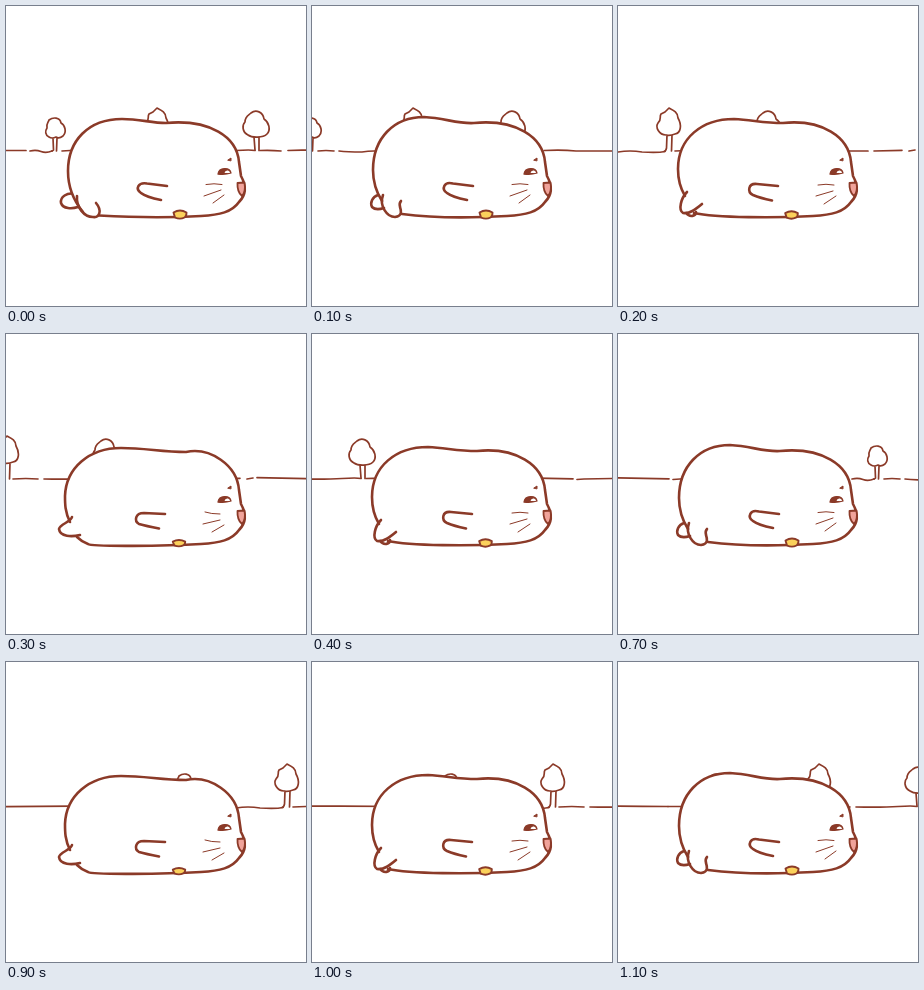
Write an HTML page that moves like this. It is 300 by 300 pixels and loops after 1.2 s.

```html
<!DOCTYPE html>
<html lang="en">
<head>
<meta charset="utf-8">
<title>Rolling along</title>
<style>
  html, body { margin: 0; width: 100%; height: 100%; overflow: hidden; background: #fff; }
  svg { display: block; width: 100vw; height: 100vh; }
  path { fill: none; stroke: #8b3a28; stroke-linecap: round; stroke-linejoin: round; }
  #scenery path { stroke-width: 1.7; }
  .bold path { stroke-width: 2.6; }
  #body { fill: #fff; }
  #whiskers { stroke-width: 1; }
</style>
</head>
<body>
<svg viewBox="0 0 300 300">
  <g id="scenery">
    <g id="strip">
      <!-- ground -->
      <path d="M0 144.5H20 M24 145Q30 143.500 35 145.500T46 145 M56 145Q64 144 72 145 M77 145
               Q85 146 100 146Q112 144 124 146Q140 147 147 145.500 M157 145Q170 144 182 145
               M188 145Q215 145.500 230 144.500T249 144.500 M254 144.500Q265 144 275 145 M282 144.500Q300 143.500 314 145
               H350 M356 145L384 144.300 M391 145L397 144 M401 143.700L461 144.800 M465 145.500L472 145
               Q540 143.500 620 144.500"/>
      <!-- trees -->
      <path d="M43 131C39 129 39 125 41 122C40 118 42 117 43 114C47 111 54 111 55 117
               C59 119 61 126 57 130Q53 133 50 131Q46 133 43 131 M47 132L47.500 144L46 145 M51 132L50.500 145"/>
      <path d="M148 129C141 129 137 121 140 117C144 114 141 111 143 108L147 106 151 102
               C155 104 160 106 160 112C164 119 163 127 157 128Q152 130 148 129
               M149 129L148.500 142Q148 145 146 145.500 M154 129L153.500 145"/>
      <path d="M242 129C236 126 236 119 239 116C239 110 243 109 245 107C250 103 257 106 258 113
               C263 116 265 124 261 128C257 132 246 132 242 129 M248 131L249 144 M253 131V144.500"/>
    </g>
    <use href="#strip" x="620"/>
  </g>
  <g class="bold">
    <path id="tail"/>
    <path id="body"/>
    <path id="foot"/>
    <path id="flipper"/>
  </g>
  <path id="whiskers"/>
  <path id="toe" style="fill:#fbd15b;stroke-width:1.9"/>
  <path d="M231.500 177L238.500 176.500Q240 186 236 190Q231 186 231.500 177Z" style="fill:#f0a39a;stroke-width:1.8"/>
  <path d="M212 168C213 161 224 161 225 167Q219 169 212 168Z" style="fill:#8b3a28;stroke-width:1.3"/>
  <path d="M218.500 167Q219 164 222 164.500Q224 165 224 167Z" style="fill:#fff;stroke:none"/>
  <path d="M222 154L225 152V154.500Z" style="fill:#8b3a28;stroke-width:1"/>
</svg>
<script>
const $ = id => document.getElementById(id);
const LOOP = 1200, STEP = 100;

// Each pose: left side and top of the body, end of the belly line, then the loose parts.
const poses = {
  low: {
    top: 'M77 206C67 194 62 181 62 165C62 135 82 113 116 113C134 113 145 117 160 117',
    belly: '120 211 93 209.500',
    tail: 'M69 188C61 186 54 191 55 197C57 203 66 203 72 201',
    foot: 'M71 190C70 201 78 211 87 211C94 212 96 204 90 197',
    flipper: 'M161 180L141 177.500C132 176 129 183 135 187Q140 191 155 194',
    whiskers: 'M200 178.500Q208 177 216 178.500M198 190L215 184M207 197L218 189',
    toe: [174, 208.5, 6.5, 4]
  },
  hump: {
    top: 'M70 195C63 184 61 174 61 164C61 132 82 111 112 111C133 112 145 118 162 117',
    belly: '120 212 90 208',
    tail: 'M66 189C60 191 58 197 60 201C63 204 69 203 72 202',
    foot: 'M71 189C67 200 75 211 83 211C91 210 89 204 88 201Q87 197 89 195',
    flipper: 'M161 180L141 177.500C132 175 129 183 135 187Q140 191 155 194',
    whiskers: 'M200 178.500Q208 177 216 178.500M198 190L215 184M207 197L218 189',
    toe: [174, 208.5, 6.5, 4]
  },
  tuck: {
    top: 'M67 190C61 180 60 172 60 163C60 132 84 113 116 113C135 114 145 117 165 117',
    belly: '98 212 76 207',
    tail: '',
    foot: 'M69 186C63 192 60 204 65 207C72 208 78 203 84 198M68 207C72 212 78 210 78 206',
    flipper: 'M160 180L139 178C130 177 129 186 135 189Q142 192 154 194.500',
    whiskers: 'M200 179Q208 177.500 216 179M198 190L215 185M206 198L218 190',
    toe: [173.5, 209, 6.3, 3.7]
  },
  stretch: {
    top: 'M64 188C59 178 59 170 59 162C60 134 83 114 115 114C140 114 155 118 180 118',
    belly: '86 213 82 210Q76 208 71 203',
    tail: '',
    foot: 'M66 183C65 188 54 190 53 195C54 203 66 203 74 201',
    flipper: 'M159 180L138 179C129 179 128 187 133 190Q140 192 153 194.500',
    whiskers: 'M199 178Q205 180 214 180M197 190L214 186M206 198L218 191',
    toe: [173, 209.2, 6.2, 3.2]
  }
};
const gait = ['low', 'hump', 'tuck', 'stretch', 'tuck', 'hump'];

const bodyPath = p => p.top +
  'C204 113 231 131 233 156L235 170C241 181 239 190 233 196C226 206 214 209 195 210C160 212 ' + p.belly;

const toePath = ([x, y, w, h]) =>
  `M${x - w} ${y - h / 2}Q${x} ${y - h * 1.5} ${x + w} ${y - h / 2}` +
  `Q${x + w} ${y + h / 2} ${x + w - 2} ${y + h - 1}Q${x} ${y + h * 1.3} ${x - w + 1.5} ${y + h - 1}Z`;

// The scenery leaps ahead after the seventh step, then rolls a little slower.
const scroll = n => n < 7 ? 50 * n : 410 + 40 * (n - 7);

function draw(now) {
  const n = Math.floor(now % LOOP / STEP);
  const p = poses[gait[n % gait.length]];
  $('scenery').setAttribute('transform', `translate(${-scroll(n)} 0)`);
  $('body').setAttribute('d', bodyPath(p));
  $('toe').setAttribute('d', toePath(p.toe));
  for (const part of ['tail', 'foot', 'flipper', 'whiskers']) $(part).setAttribute('d', p[part]);
}

const start = performance.now();
function tick() {
  draw(performance.now() - start);
  requestAnimationFrame(tick);
}
tick();
</script>
</body>
</html>
```
